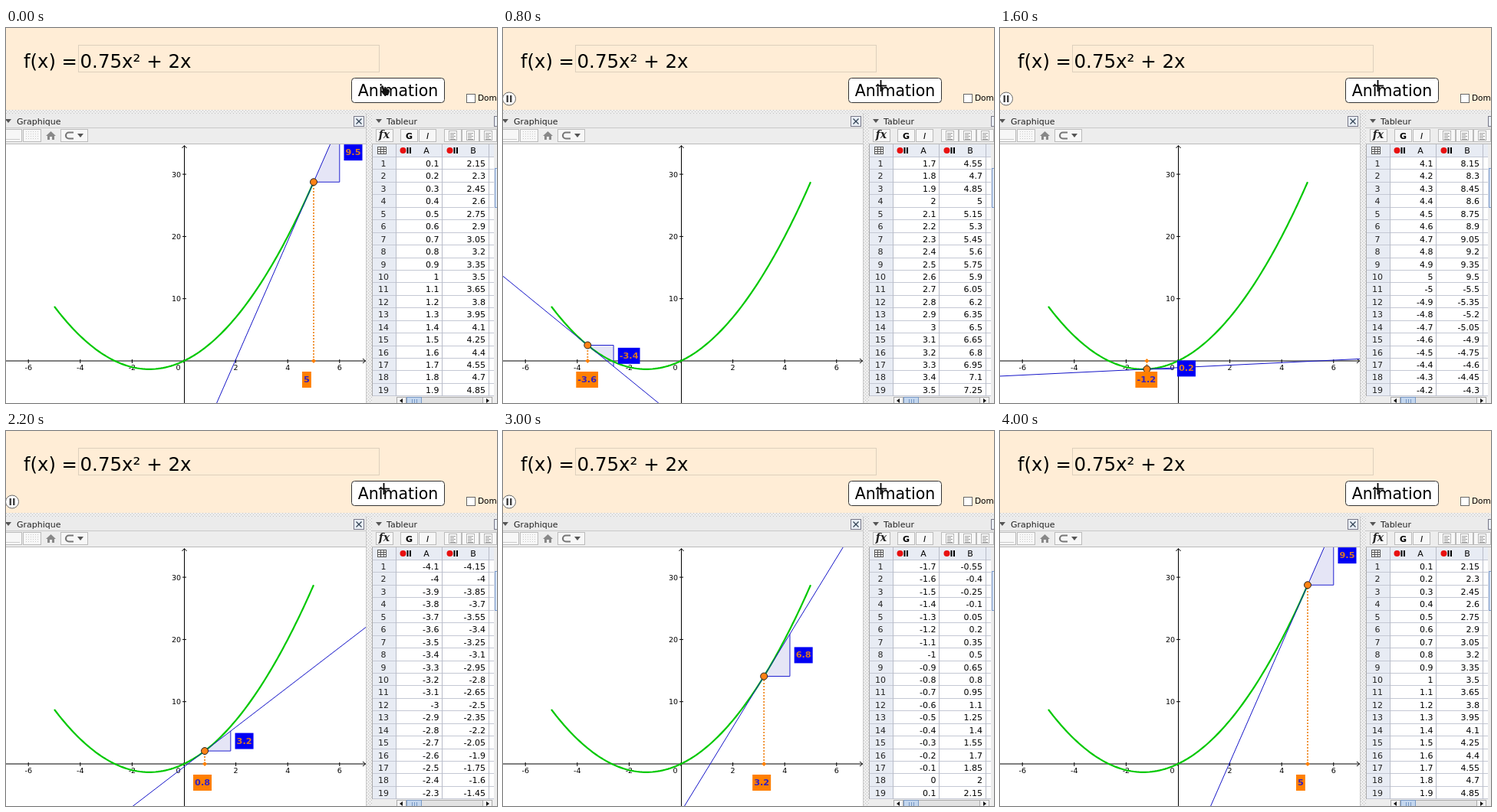
These frames come from a looping animation (640x490 px, 4.2 s). An HTML page with a canvas:

```html
<!DOCTYPE html>
<html lang="fr">
<meta charset="utf-8">
<title>Animation</title>
<style>
html, body { margin: 0; width: 100%; height: 100%; overflow: hidden; background: #ffedd6 }
canvas { display: block }
</style>
<canvas id="stage" width="640" height="490"></canvas>
<script>
const c = document.getElementById('stage').getContext('2d');
const SANS = '"DejaVu Sans", sans-serif';
const ORANGE = '#ff7f00', BLUE = '#0000f4';
const STEP = 200, STEPS = 21;

const f = x => 0.75 * x * x + 2 * x;
const slope = x => 1.5 * x + 2;
const px = x => 232 + 33.8 * x;
const py = y => 435 - 8.13 * y;
const value = i => (i - 50) / 10;
const show = v => String(+v.toFixed(2));

function rect(x, y, w, h, fill, stroke) {
  if (fill) { c.fillStyle = fill; c.fillRect(x, y, w, h); }
  if (stroke) {
    c.strokeStyle = stroke;
    c.lineWidth = 1;
    c.strokeRect(x + .5, y + .5, w - 1, h - 1);
  }
}

function text(s, x, y, size, align = 'left', color = '#000', style = '', family = SANS) {
  c.font = `${style} ${size}px ${family}`;
  c.textAlign = align;
  c.fillStyle = color;
  c.fillText(s, x, y);
}

function path(points, stroke, width = 1, fill) {
  c.beginPath();
  points.forEach(([x, y]) => c.lineTo(x, y));
  if (fill) { c.fillStyle = fill; c.fill(); }
  if (stroke) { c.strokeStyle = stroke; c.lineWidth = width; c.stroke(); }
}

const line = (x1, y1, x2, y2, color, width) => path([[x1, y1], [x2, y2]], color, width);

function disc(x, y, r, fill, stroke) {
  c.beginPath();
  c.arc(x, y, r, 0, 7);
  if (fill) { c.fillStyle = fill; c.fill(); }
  if (stroke) { c.strokeStyle = stroke; c.lineWidth = 1; c.stroke(); }
}

function rounded(x, y, w, h, r, fill, stroke) {
  c.beginPath();
  c.roundRect(x, y, w, h, r);
  c.fillStyle = fill;
  c.fill();
  c.strokeStyle = stroke;
  c.lineWidth = 1;
  c.stroke();
}

function dots(x, y, w, h) {
  rect(x, y, w, h, '#ededed');
  for (let r = 0; r < h; r += 2)
    for (let q = r % 4; q < w; q += 4) rect(x + q, y + r, 1, 1, '#c0c0c0');
}

const arrowDown = (x, y, s = 4) => path([[x - s, y - s / 2], [x + s, y - s / 2], [x, y + s / 2 + 1]], null, 1, '#555');

function cross(x, y, r, color) {
  line(x - r, y - r, x + r, y + r, color, 1.3);
  line(x - r, y + r, x + r, y - r, color, 1.3);
}

function formulaBar(running, clicked) {
  rect(0, 0, 640, 107, '#ffedd6');
  rect(94, 22, 393, 36, null, '#ddd0bd');
  text('f(x) =', 23, 52, 24.3);
  text('0.75x² + 2x', 96.5, 52, 24.5);
  rounded(450.5, 65.5, 121, 32, 4, '#fff', '#333');
  text('Animation', 511, 89, 20.5, 'center');
  rect(600, 86, 12, 12, '#fff', '#666');
  text('Dom', 615, 95, 10.5);
  if (running) {
    disc(8, 92.5, 8.5, '#fff', '#666');
    rect(4.5, 88, 2.5, 9, '#444');
    rect(9, 88, 2.5, 9, '#444');
  }
  if (clicked) {
    line(486, 75.5, 500, 75.5, '#000', 1.8);
    line(492.5, 68, 492.5, 83, '#000', 1.8);
  } else {
    path([[489, 76], [491, 75], [493, 79], [499, 80], [500, 83], [498, 88], [493, 88], [488, 82], [491, 82]], null, 1, '#111');
  }
}

function titleBar(x, w, title) {
  rect(x, 112, w, 19, '#ebebeb');
  line(x, 130.5, x + w, 130.5, '#c9c9c9');
  rect(x, 131, w, 21, '#ededed');
  line(x, 151.5, x + w, 151.5, '#bbb');
  text(title, x ? 496 : 14, 125.5, 11, 'left', '#222');
}

function toolButton(x, w) { rect(x, 132, w, 17, '#f7f7f7', '#bbb'); }

function graphPanel() {
  titleBar(0, 470, 'Graphique');
  arrowDown(3, 121);
  rect(453, 115, 14, 14, '#e9eef5', '#778');
  cross(460, 122, 3.5, '#345');
  toolButton(-3, 24);
  line(0, 145.5, 18, 145.5, '#ccc');
  toolButton(22, 24);
  for (let x = 26; x < 44; x += 3)
    for (let y = 135; y < 147; y += 3) rect(x, y, 1, 1, '#ccc');
  path([[52, 141], [58.5, 135], [65, 141], [63, 141], [63, 146], [60, 146], [60, 142], [57, 142], [57, 146], [54, 146], [54, 141]], null, 1, '#888');
  toolButton(71, 36);
  c.beginPath();
  c.arc(82, 140.5, 4, Math.PI / 2, Math.PI * 1.5);
  c.strokeStyle = '#777';
  c.lineWidth = 2.2;
  c.stroke();
  line(82, 136.5, 88, 136.5, '#777', 2);
  line(82, 144.5, 88, 144.5, '#777', 2);
  arrowDown(97, 140);
}

function axes() {
  line(0, 435, 469, 435, '#000');
  line(232.5, 154, 232.5, 490, '#000');
  path([[465, 432], [468.5, 435], [465, 438]], '#000');
  path([[229.5, 157], [232.5, 153.5], [235.5, 157]], '#000');
  for (let x = -6; x < 7; x += 2) {
    line(px(x), 433, px(x), 438, '#000');
    if (x) text(x, px(x), 447, 9.5, 'center');
  }
  text('0', 224.5, 447, 9.5, 'center');
  for (let y = 10; y < 31; y += 10) {
    line(230, py(y), 235, py(y), '#000');
    text(y, 228, py(y) + 3.5, 9.5, 'right');
  }
}

function tag(s, x, y, back, ink) {
  c.font = `bold 11.3px ${SANS}`;
  const w = c.measureText(s).width + 4;
  rect(x, y - 10.5, w, 21, back);
  text(s, x + 2, y + 3.5, 11.3, 'left', ink, 'bold');
}

function graph(a) {
  const m = slope(a), y = f(a), x = px(a), right = px(a + 1);
  const tangent = u => py(y + m * (u - a));
  c.save();
  c.beginPath();
  c.rect(0, 152, 469, 338);
  c.clip();
  rect(0, 152, 469, 338, '#fff');
  axes();
  path([[x, py(y)], [right, py(y)], [right, tangent(a + 1)]], '#2020d0', 1, 'rgba(0,0,170,.1)');

  const curve = [];
  for (let u = -5; u < 5.01; u += .1) curve.push([px(u), py(f(u))]);
  path(curve, '#00c800', 2.2);
  line(px(-8), tangent(-8), px(8), tangent(8), '#1414c8', 1);

  c.setLineDash([2, 2]);
  line(x, 435, x, py(y), '#f08c28', 1.8);
  c.setLineDash([]);
  path([[x - 3, 435], [x, 432], [x + 3, 435], [x, 438]], null, 1, ORANGE);
  disc(x, py(y), 4.5, '#ff8214', '#222');
  tag(show(a), x - 15, 459.5, ORANGE, '#3420c0');
  tag(show(m), right + 5.7, py(y + m / 2), BLUE, '#d87828');
  c.restore();
}

function sheetPanel() {
  titleBar(477, 163, 'Tableur');
  arrowDown(486, 121);
  rect(636, 115, 14, 14, '#e9eef5', '#778');
  toolButton(482, 23);
  text('fx', 493, 144, 14, 'center', '#222', 'italic bold', '"DejaVu Serif", serif');
  toolButton(514, 23);
  text('G', 525.5, 144.5, 11, 'center', '#000', 'bold');
  toolButton(538, 23);
  text('I', 549.5, 144.5, 11, 'center', '#000', 'italic');
  for (const x of [571, 594, 617]) {
    toolButton(x, 23);
    rect(x + 6, 134, 11, 13, '#fff', '#b4b4b4');
    for (let y = 137; y < 146; y += 2) rect(x + 8, y, y % 4 == 1 ? 7 : 5, 1, '#999');
  }
}

function sheet(first) {
  const top = 168.5, pitch = 16.44, grid = '#c4c8d4';
  rect(477, 152, 163, 338, '#fff');
  rect(477, 152, 163, 17, '#e8ecf4');
  rect(477, 152, 31, 330, '#e8ecf4');
  rect(484, 155, 12, 10, '#fff', '#555');
  line(484, 158.5, 496, 158.5, '#555');
  line(484, 161.5, 496, 161.5, '#555');
  line(488.5, 155, 488.5, 165, '#555');
  line(492.5, 155, 492.5, 165, '#555');
  ['A', 'B'].forEach((name, i) => {
    const x = 508 + 61 * i;
    disc(x + 9.5, 160, 4, '#e81010');
    rect(x + 14.5, 156, 2, 8, '#000');
    rect(x + 18, 156, 2, 8, '#000');
    text(name, x + 40, 164, 11, 'center');
  });
  for (let r = 0; r < 19; r++) {
    const y = top + pitch * r, v = value((first + r) % 101);
    line(477, Math.floor(y) + .5, 637, Math.floor(y) + .5, grid);
    text(r + 1, 492, y + 12.5, 11, 'center', '#222');
    text(show(v), 564.5, y + 12.5, 11, 'right');
    text(show(slope(v)), 625, y + 12.5, 11, 'right');
  }
  line(477, 480.5, 637, 480.5, grid);
  for (const x of [508.5, 568.5, 629.5]) line(x, 152, x, 481, '#b9bcc8');
  line(477.5, 152, 477.5, 490, '#aaa');

  // scroll bars
  rect(636, 152, 4, 338, '#ececec');
  rect(637, 183, 6, 52, '#dce8f6', '#7898cc');
  rect(477, 481, 163, 9, '#ededed');
  rect(509, 482, 125, 10, '#e2e2e2', '#aaa');
  rect(509, 482, 13, 10, '#f4f4f4', '#aaa');
  rect(621, 482, 13, 10, '#f4f4f4', '#aaa');
  path([[517, 484], [517, 490], [513, 487]], null, 1, '#111');
  path([[626, 484], [626, 490], [630, 487]], null, 1, '#111');
  rect(522, 482, 20, 10, '#c3d6ee', '#7898c4');
  for (const x of [529, 532, 535]) rect(x, 485, 1, 5, '#7898c4');
}

function draw(k) {
  const started = k > 1;
  // the slider skips two extra steps halfway
  const i = started ? Math.min(100, 6 * k - 10 + (k > 10 ? 2 : 0)) : 100;
  const first = (i + 52 + (started && k < 11 ? 1 : 0)) % 101;
  formulaBar(started && k < 20, started);
  dots(0, 107, 640, 5);
  graphPanel();
  graph(value(i));
  sheetPanel();
  sheet(first);
  dots(470, 112, 7, 378);
  line(469.5, 112, 469.5, 490, '#ccc');
}

let start;
function tick(now) {
  start ??= now;
  draw(Math.floor((now - start) / STEP) % STEPS);
  requestAnimationFrame(tick);
}
requestAnimationFrame(tick);
</script>
</html>
```
